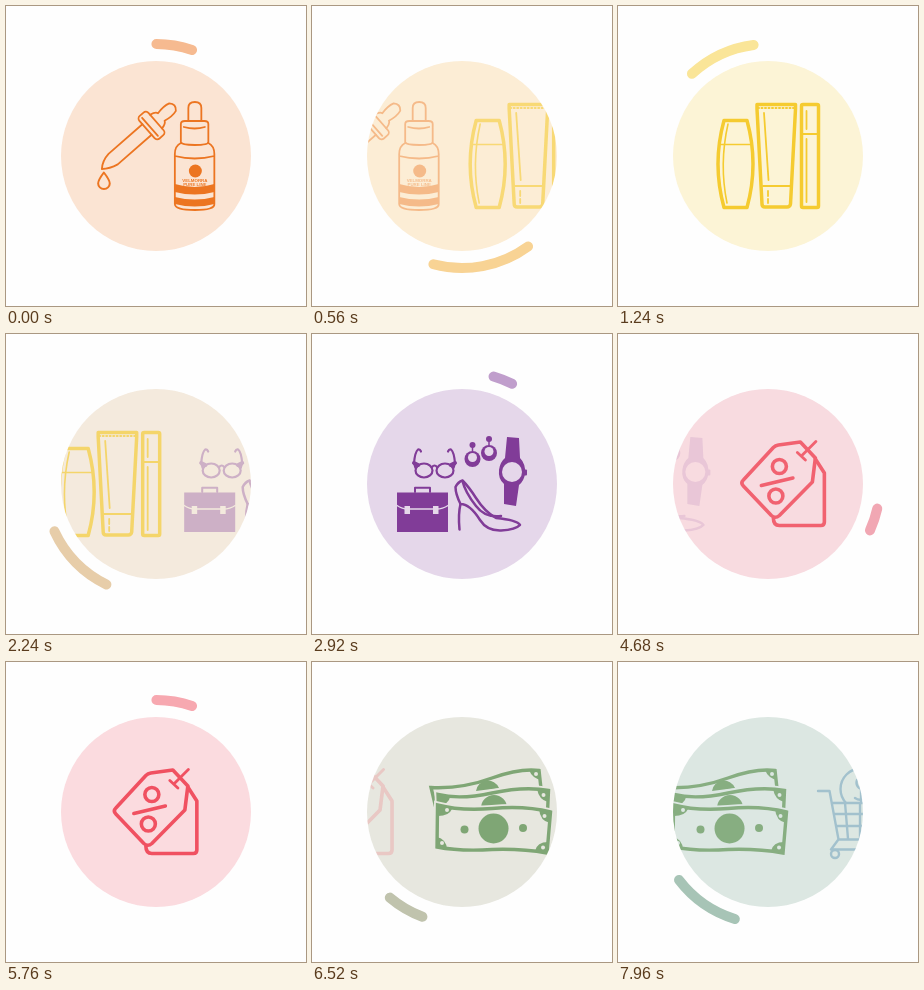
An HTML page for the animation above (8 s loop, 300 by 300 pixels).

```html
<!DOCTYPE html>
<html lang="en">
<head>
<meta charset="utf-8">
<title>Category carousel</title>
<style>
html, body { margin: 0; width: 100%; height: 100%; overflow: hidden; background: #fefefe; }
svg { display: block; width: 100vw; height: 100vh; }
.icon { fill: none; stroke: var(--c); stroke-linecap: round; stroke-linejoin: round; }
.solid { fill: var(--c); stroke: none; }
.pale { fill: var(--disc); stroke: none; }
.bill { fill: var(--disc); }
.gap { stroke: var(--disc); stroke-width: 7px; }
text { font: 700 4.4px "Liberation Sans", Arial, sans-serif; fill: var(--c); stroke: none; text-anchor: middle; }
</style>
</head>
<body>
<svg viewBox="0 0 300 300">
  <defs>
    <clipPath id="lens"><circle cx="150" cy="150" r="95"/></clipPath>
    <path id="mid" d="M126 132.500Q148 138 180 131Q213 124 236.500 128.500L235 160L127 158Z"/>
    <path id="front" d="M125.500 143Q148 149 180 146.500Q213 143.500 238.500 150L235 191Q210 186.500 180 187.500Q148 189.500 125 185Z"/>
  </defs>
  <circle id="disc" cx="150" cy="150" r="95"/>
  <path id="ring" fill="none" stroke-width="10" stroke-linecap="round"/>
  <g clip-path="url(#lens)">
    <!-- serum -->
    <g class="icon" stroke-width="1.8">
      <g transform="translate(96 163) rotate(-41.2)">
        <path d="M60-7H15Q6-6 0 0Q6 5 15 7H60"/>
        <rect x="60" y="-15" width="12" height="30" rx="3.500"/>
        <path d="M64-12V12M72-9Q78-8 79-5Q88-7 94-5Q99 0 94 5Q88 7 79 5Q78 8 72 9"/>
      </g>
      <path d="M98 166.500Q92.300 174 92.300 177.500A5.800 5.500 0 0 0 103.900 177.500Q103.900 174 98 166.500Z" stroke-width="2"/>
      <path d="M182.500 115V102Q182.500 96 189 96T195.500 102V115"/>
      <path d="M175 118Q175 115 179 115H198.500Q202.500 115 202.500 118V136Q202.500 139 189 139T175 136ZM178 121Q189 124 199 121"/>
      <path d="M175 137Q169 140 169 148V198Q169 204 189 204T208.500 198V148Q208.500 140 202.500 137M169 150Q189 155 208.500 150"/>
      <path class="solid" d="M169 178Q189 184 208.500 178V186Q189 191 169 186ZM169 191Q189 196 208.500 191V198Q189 203 169 198Z"/>
      <circle class="solid" cx="189.500" cy="165" r="6.500"/>
      <text x="189" y="176">VELMORRA</text>
      <text x="189" y="180">PURE LINE</text>
    </g>
    <!-- cosmetics -->
    <g class="icon" stroke-width="3.500">
      <path d="M106 114.500H129Q141 158 129 201.500H106Q94 158 106 114.500Z"/>
      <path d="M101.500 138.500H133.500M110 118Q101 158 109 197" stroke-width="1.600"/>
      <path d="M139 98.500H177.500V103L172.500 198Q172 201 169 201H147Q144 201 144 198L139 103Z"/>
      <path d="M140 102H176" stroke-dasharray="1 2.500" stroke-width="2"/>
      <path d="M145 180H172M146 107L150.500 174M150 185V190M150 193V197" stroke-width="1.800"/>
      <rect x="183.500" y="98.500" width="17" height="103" rx="1.500"/>
      <path d="M184 128H200M188.500 105V123M188.500 133V196" stroke-width="1.800"/>
    </g>
    <!-- accessories -->
    <g class="icon" stroke-width="2.200">
      <ellipse cx="112" cy="136.500" rx="8.500" ry="7"/>
      <ellipse cx="133" cy="136.500" rx="8.500" ry="7"/>
      <path d="M120 133Q122.500 130 125 133M103.500 134L102 129Q103 118 106 115.500Q108 115 109 117.500M141.500 134L143 129Q142 118 139 115.500Q137 115 136 117.500"/>
      <path d="M102 129L106 131M143 129L139 131" stroke-width="4"/>
      <g id="drop">
        <circle class="solid" cx="160.500" cy="111" r="3"/>
        <path d="M160.500 113V117" stroke-width="1.500"/>
        <circle class="solid" cx="160.500" cy="125" r="8"/>
        <circle class="pale" cx="160.500" cy="123.500" r="4.500"/>
      </g>
      <use href="#drop" x="16.500" y="-6"/>
      <path class="solid" d="M195 103L207 104L208 124Q214 130 213 140Q212 147 207 151L204 172L192 170L192 150Q186 145 187 136Q188 128 193 124Z"/>
      <rect class="solid" x="211" y="135.500" width="4" height="6" rx="1"/>
      <circle class="pale" cx="200" cy="138" r="10"/>
      <path class="solid" d="M85 158.500H136V198H85Z"/>
      <path d="M103 158V153.800H118V158" stroke-width="2"/>
      <path d="M85 171.500Q90 175 96 175H124Q131 175 136 171.500" style="stroke:var(--disc)" stroke-width="1.300"/>
      <path class="pale" d="M92.500 172h5.500v8h-5.500zM121 172h5.500v8H121z"/>
      <path d="M143.500 153Q146 148 150.500 146.500Q157 153 164 164Q173 178 184 184Q205 186 208 191Q204 195.500 189 196.500Q175 197 168 186Q158 170 148.500 170Q143.500 160 143.500 153Z" stroke-width="2.500"/>
      <path d="M148.500 170Q146 180 147.500 195.500M150.500 147Q153 158 164 172Q173 184 189 182" stroke-width="2.500"/>
    </g>
    <!-- discount tags -->
    <g class="icon" stroke-width="3.600">
      <path d="M182 125L191 139V188Q191 191.500 187.500 191.500H146Q140 191.500 140 184"/>
      <path d="M110 146L140 113.500Q142 111.500 145 111L167 108L182 124L179 148L146 181.500Q142 185 138 181.500L110 152Q107 149 110 146Z"/>
      <circle cx="146" cy="132.500" r="7"/>
      <circle cx="142.500" cy="162" r="7"/>
      <path d="M128 151.500L159.500 144"/>
      <path d="M169 121L182.500 107.500M164 118.500L172 126" stroke-width="2.800"/>
    </g>
    <!-- money -->
    <g class="icon" stroke-width="3.400"><g transform="translate(-29 0)" stroke-linejoin="miter">
      <path class="bill" d="M119 125.500Q150 127 180 116Q208 106 227 108.500L231 145L126 155Z"/>
      <path class="solid" d="M164 129A12 12 0 0 1 187 126ZM228 108L229 118Q220 116 217 108Z"/>
      <use href="#mid" class="gap"/>
      <use href="#mid" class="bill"/>
      <path class="solid" d="M169 146A13 13 0 0 1 195 146ZM237 128L236 140Q227 138 225 127ZM126 133L138 135Q137 142 127 143Z"/>
      <use href="#front" class="gap"/>
      <use href="#front" class="bill"/>
      <path class="solid" d="M126 143L140 147Q137 154 126 154ZM239 150L238 161Q228 159 227 147ZM235 192L236 180Q225 180 223 189ZM125 185L125 175Q134 177 135 187Z"/>
      <circle class="solid" cx="181.500" cy="166.500" r="15"/>
      <circle class="solid" cx="152.500" cy="167.500" r="4"/>
      <circle class="solid" cx="211" cy="166" r="4"/>
      <g class="pale">
        <circle cx="135" cy="148" r="2"/><circle cx="232.500" cy="154" r="2"/>
        <circle cx="231" cy="185.500" r="2"/><circle cx="130" cy="181" r="2"/>
        <circle cx="231.500" cy="133" r="2"/><circle cx="224" cy="112" r="2"/>
      </g>
    </g></g>
    <!-- cart -->
    <g class="icon" stroke-width="2.400"><g transform="translate(-99 0)">
      <circle cx="243" cy="127" r="20.500"/>
      <path d="M249 118Q243 113 239 118Q237 124 243 127Q249 130 247 135Q243 140 237 136M243 111V143"/>
      <path class="pale" d="M214 141H275L268 178H220Z"/>
      <path d="M200 129H211.500L220.500 177.500H267L275 141H214M216 152H272M218 164H270M227 141L230 177M242 141V177M259 141L256 177M220 178L213 187.500H266"/>
      <circle cx="217" cy="192" r="4"/>
      <circle cx="261" cy="192" r="4"/>
    </g></g>
  </g>
</svg>
<script>
const LOOP = 8000, SLOT = 1920, SLIDE = 960, TURN = 240, EXIT = 140;
const themes = [
  { main: [236, 117, 33], pale: [251, 228, 211], enter: 140 },
  { main: [245, 203, 48], pale: [252, 244, 214], enter: 140 },
  { main: [129, 60, 152], pale: [229, 215, 234], enter: 140 },
  { main: [240, 81, 97], pale: [251, 219, 223], enter: 124 },
  { main: [100, 150, 89], pale: [226, 234, 223], enter: 140 },
  { main: [26, 104, 158], pale: [207, 223, 232], enter: 140 }
];
// Ring ends: [ms, degrees] within one 960 ms cycle that advances 240 degrees.
const tailKeys = [[0, 0], [40, 16], [120, 43], [200, 60], [280, 77], [520, 133], [760, 200.400], [840, 222.500]];
const headKeys = [[0, 18.600], [40, 26.300], [120, 52], [200, 80.500], [280, 112.300], [600, 204], [760, 220]];

const svg = document.querySelector('svg');
const disc = document.getElementById('disc');
const ring = document.getElementById('ring');
const icons = [...document.querySelectorAll('.icon')];
const rgb = c => `rgb(${c.map(Math.round).join()})`;
const mix = (a, b, p) => a.map((v, i) => v + (b[i] - v) * p);
const tint = c => mix(c, [255, 255, 255], 0.5);

icons.forEach((icon, i) => icon.style.setProperty('--c', rgb(themes[i].main)));

function keyAt(keys, i) {
  const n = keys.length, wrap = Math.floor(i / n), [t, v] = keys[i - wrap * n];
  return [t + wrap * SLIDE, v + wrap * TURN];
}

function slope(keys, i) {
  const a = keyAt(keys, i - 1), b = keyAt(keys, i + 1);
  return (b[1] - a[1]) / (b[0] - a[0]);
}

// Cubic Hermite curve through the repeating keys.
function angleAt(keys, time) {
  const cycle = Math.floor(time / SLIDE), t = time - cycle * SLIDE;
  let i = 0;
  while (keyAt(keys, i + 1)[0] <= t) i++;
  const [t0, v0] = keyAt(keys, i), [t1, v1] = keyAt(keys, i + 1);
  const d = t1 - t0, s = (t - t0) / d, s2 = s * s, s3 = s2 * s;
  return cycle * TURN + v0 * (2 * s3 - 3 * s2 + 1) + v1 * (3 * s2 - 2 * s3)
    + d * (slope(keys, i) * (s3 - 2 * s2 + s) + slope(keys, i + 1) * (s3 - s2));
}

function point(deg) {
  const a = deg * Math.PI / 180;
  return `${(150 + 112 * Math.sin(a)).toFixed(2)} ${(150 - 112 * Math.cos(a)).toFixed(2)}`;
}

function place(icon, x, opacity) {
  icon.style.display = opacity > 0 ? '' : 'none';
  icon.setAttribute('transform', `translate(${x.toFixed(2)} 0)`);
  icon.setAttribute('opacity', opacity.toFixed(3));
}

function render(t) {
  const from = Math.floor(t / SLOT), to = from + 1;
  const p = Math.min(1, (t - from * SLOT) / SLIDE);
  const a = themes[from], b = themes[to];
  const shade = rgb(mix(a.pale, b.pale, p));
  svg.style.setProperty('--disc', shade);
  disc.setAttribute('fill', shade);
  ring.setAttribute('stroke', rgb(mix(tint(a.main), tint(b.main), p)));
  ring.setAttribute('d', `M${point(angleAt(tailKeys, t))}A112 112 0 0 1 ${point(angleAt(headKeys, t))}`);
  icons.forEach((icon, i) => {
    if (i === from) place(icon, -EXIT * p, 1 - p);
    else if (i === to) place(icon, b.enter * (1 - p), p);
    else place(icon, 0, 0);
  });
}

const start = performance.now();
function tick() {
  render((performance.now() - start) % LOOP);
  requestAnimationFrame(tick);
}
tick();
</script>
</body>
</html>
```
